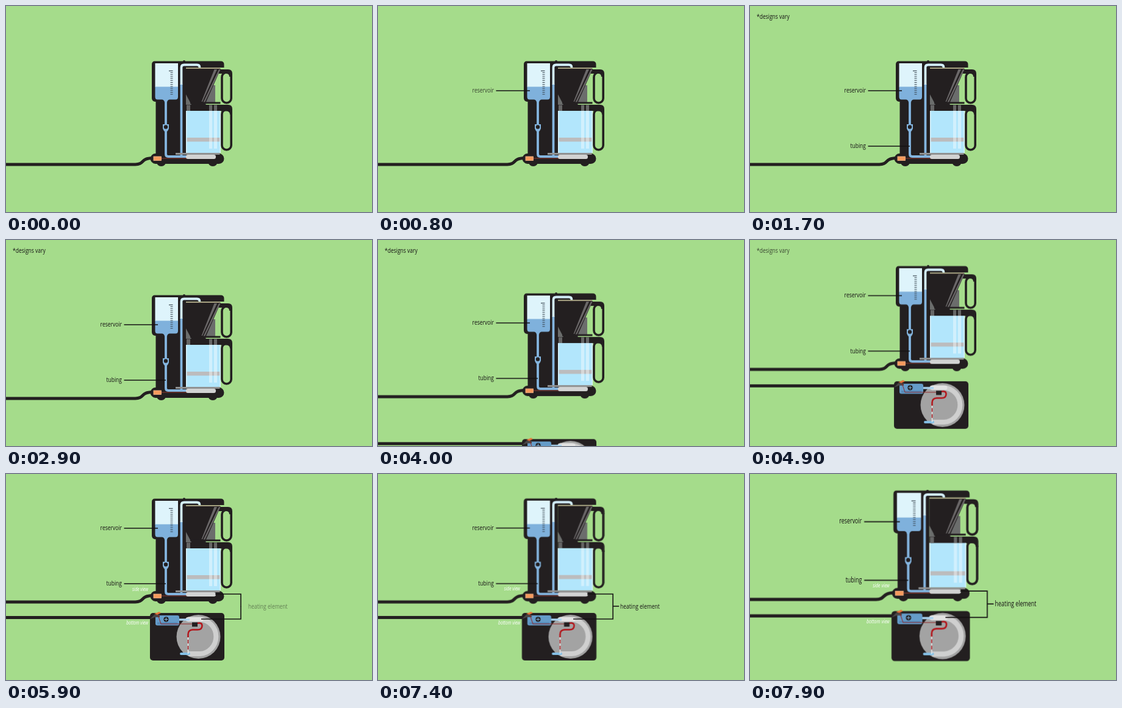
An HTML page without scripts for the animation above (8000 ms loop, 600x338 px).

```html
<!DOCTYPE html>
<html lang="en">
<head>
<meta charset="utf-8">
<title>Coffee maker diagram</title>
<style>
html, body { margin: 0; width: 100%; height: 100%; overflow: hidden; background: #a5dc8b; }
svg { display: block; width: 100vw; height: 100vh; }
text { font: 500 11.5px "Open Sans", "Noto Sans", sans-serif; fill: #151213; }
.end { text-anchor: end; }
.view { font-size: 9px; font-style: italic; fill: #fff; }
.dark { fill: #231f20; }
.line, .tube, .cable, .loop { fill: none; }
.line { stroke: #151213; stroke-width: 1.6; stroke-dasharray: 1 2; }
.tube { stroke: #84b5df; stroke-width: 3.8; stroke-linejoin: round; }
.air { stroke: #d3eefa; }
.cable { stroke: #231f20; stroke-width: 5; }
.loop { stroke: #231f20; stroke-width: 3.6; }

.zoom, .side, .bottom, .a { animation: 8s linear infinite; }
.zoom { animation-name: zoom; transform-origin: 312px 288px; }
.side { animation-name: side; }
.bottom { animation-name: bottom; }
.res-line { animation-name: resLine; }
.res-text { animation-name: resText; }
.tub-line { animation-name: tubLine; }
.tub-text { animation-name: tubText; }
.note { animation-name: note; }
.views { animation-name: views; }
.heat-line { animation-name: heatLine; }
.heat-tick { animation-name: heatTick; }
.heat-text { animation-name: heatText; }

@keyframes zoom {
  0%, 90% { transform: scale(1); animation-timing-function: cubic-bezier(.33, 0, .67, 0); }
  100% { transform: scale(1.08); }
}
@keyframes side {
  0%, 45% { transform: translateY(0); animation-timing-function: cubic-bezier(.69, 0, .34, 1); }
  65.6%, 100% { transform: translateY(-50px); }
}
@keyframes bottom {
  0%, 45% { transform: translateY(117px); animation-timing-function: cubic-bezier(.42, 0, .48, 1); }
  64.2%, 100% { transform: translateY(0); }
}
@keyframes resLine { 0%, 5% { stroke-dashoffset: 1.02; } 9%, 100% { stroke-dashoffset: 0; } }
@keyframes tubLine { 0%, 12% { stroke-dashoffset: 1.02; } 16%, 100% { stroke-dashoffset: 0; } }
@keyframes heatLine { 0%, 67.5% { stroke-dashoffset: 1.02; } 72.5%, 100% { stroke-dashoffset: 0; } }
@keyframes heatTick { 0%, 74% { stroke-dashoffset: 1.02; } 76%, 100% { stroke-dashoffset: 0; } }
@keyframes resText { 0%, 7% { opacity: 0; } 11%, 100% { opacity: 1; } }
@keyframes tubText { 0%, 13.5% { opacity: 0; } 17.5%, 100% { opacity: 1; } }
@keyframes heatText { 0%, 71.5% { opacity: 0; } 76.5%, 100% { opacity: 1; } }
@keyframes views { 0%, 66% { opacity: 0; } 71%, 100% { opacity: 1; } }
@keyframes note { 0%, 15% { opacity: 0; } 20%, 59% { opacity: 1; } 68%, 100% { opacity: 0; } }
</style>
</head>
<body>
<svg viewBox="0 0 600 338" preserveAspectRatio="none">
<rect width="600" height="338" fill="#a5dc8b"/>
<g class="zoom">

  <g class="bottom">
    <path class="cable" d="M-20 235.500H239Q245 235.500 249 231"/>
    <rect class="dark" x="236" y="228" width="122" height="78" rx="5"/>
    <circle cx="315.500" cy="267" r="36" fill="#a3a3a3"/>
    <path d="M298 238.500H318A28 28.300 0 0 1 318 295H299" fill="none" stroke="#cfcfcf" stroke-width="8"/>
    <path d="M298 238.500H320" stroke="#e2e2e2" stroke-width="7" stroke-linecap="round"/>
    <path d="M283 239H301" stroke="#a9d3ef" stroke-width="3.400"/>
    <path d="M287 295H300" stroke="#84c0e6" stroke-width="4" stroke-linecap="round"/>
    <!-- tank -->
    <rect x="245" y="232" width="39" height="16.500" rx="3" fill="#659cc9"/>
    <path d="M248 245H281" stroke="#5587b5" stroke-width="3"/>
    <circle class="dark" cx="262.500" cy="238.500" r="4.200"/>
    <path d="M259.500 238.500h6M262.500 235.500v6" stroke="#84b5df"/>
    <path d="M236 238L243 231H252V235H244Z" fill="#4a4748"/>
    <path d="M243 229.500L251 226L254 228L248 231Z" fill="#e8743b"/>
    <!-- wiring -->
    <path d="M249 231L254 246H306" fill="none" stroke="#8f2626"/>
    <path d="M313 245Q321.500 243 321.500 249Q321.500 255.500 314 255.500H306Q298.500 256 298.500 263V268" fill="none" stroke="#b3151b" stroke-width="2.500"/>
    <path d="M298.500 268V295" stroke="#eee" stroke-width="1.400"/>
    <path d="M298.500 272V292" stroke="#b3151b" stroke-width="1.400" stroke-dasharray="6 4"/>
    <rect class="dark" x="305" y="243.500" width="9" height="7"/>
  </g>

  <g class="side">
    <path class="cable" d="M-20 260H212C227 260 220 250 240 249.500"/>
    <!-- housing -->
    <path class="dark" d="M244 90.500H352Q357.500 90.500 357.500 96V101H295V242H349A8.500 8.500 0 0 1 349 259H245A8.500 8.500 0 0 1 245.500 242V157H244Q239 156 239 151V96Q239 90.500 244 90.500Z"/>
    <circle class="dark" cx="292" cy="91" r="2"/>
    <circle class="dark" cx="254.500" cy="255" r="8"/>
    <circle class="dark" cx="339" cy="255" r="8"/>

    <!-- reservoir -->
    <path d="M244.500 94H282V133H244.500Z" fill="#def4fb"/>
    <path d="M244.500 132.500H282V149Q282 153.500 278 153.500H268Q264.500 154 264 158H260Q259.500 154 256 153.500H248.500Q244.500 153.500 244.500 149Z" fill="#7fb1dc"/>
    <path d="M271.500 109V146.500" stroke="#3a4650" stroke-width="4" stroke-dasharray="1 2.200"/>
    <path d="M267 106.500H273.500" stroke="#3a4650" stroke-width="1.200"/>

    <!-- tubing -->
    <path class="tube" d="M262 155V243Q262 247 266 247H297M287.500 247V128"/>
    <path class="tube air" d="M287.500 129V101Q287.500 96.500 292 96.500H313Q317.500 96.500 317.500 101"/>
    <path d="M257 194H267V201Q266 204 264 206H260Q258 204 257 201Z" fill="#84b5df"/>
    <circle class="dark" cx="262" cy="198.500" r="3.200"/>

    <!-- power and heater -->
    <path d="M254 250H300" stroke="#8f3a30"/>
    <rect x="242" y="247" width="12.500" height="6.500" fill="#f59a5c" stroke="#f8b68c" stroke-width=".8"/>
    <rect x="295" y="244" width="49" height="7" rx="3.200" fill="#d2d3d3"/>
    <rect x="278" y="241" width="72.500" height="3" fill="#919292"/>

    <!-- filter basket -->
    <rect class="loop" x="354" y="109" width="15.200" height="50" rx="7.500"/>
    <path class="dark" d="M349 104H364Q371 104 371 111V116H366Q366 111 361 111H349Z"/>
    <path d="M295 130H343V160H328V162.500H295Z" fill="#6b6d6c"/>
    <path class="dark" d="M295 103H352L326 162H304L295 145Z"/>
    <path d="M349 104H351.500L326 158H323.500ZM341.500 104H346L322 157H320.500Z" fill="#6b6869"/>
    <path d="M295 102.200H351" stroke="#a79a80" stroke-width="1.800"/>
    <path d="M302 159H351.500" stroke="#231f20" stroke-width="3"/>

    <!-- carafe -->
    <rect class="loop" x="354" y="170" width="15.200" height="66" rx="7.500"/>
    <path class="dark" d="M295 162H364Q371 162 371 169V178H367Q367 172.500 361 172.500H295Z"/>
    <path class="dark" d="M304 163L307 160H325L329 163Z"/>
    <rect x="295" y="172" width="57" height="69" fill="#b2e6fc"/>
    <rect x="295" y="216" width="57" height="6.500" fill="#bcbcbd"/>
    <path d="M296 162.500H302V172H296ZM333 162.500H338V172H333ZM341 162.500H346V172H341Z" fill="#666"/>
    <path d="M333 172H338V234H333ZM341 172H346V234H341Z" fill="#fff" opacity=".4"/>
    <path d="M295.800 172V241M351.200 172V241" stroke="#d7f1fb" stroke-width="1.600"/>

    <path class="line a res-line" pathLength="1" d="M249 139H193.500"/>
    <path class="line a tub-line" pathLength="1" d="M262 230H193.500"/>
    <text class="end a res-text" transform="translate(190 142) scale(.74 1)">reservoir</text>
    <text class="end a tub-text" transform="translate(190 233.300) scale(.74 1)">tubing</text>
  </g>

  <text class="a note" transform="translate(11 21) scale(.74 1)">*designs vary</text>
  <g class="a views">
    <text class="view end" transform="translate(233 191.500) scale(.74 1)">side view</text>
    <text class="view end" transform="translate(233 247) scale(.74 1)">bottom view</text>
  </g>
  <path class="line a heat-line" pathLength="1" d="M343 197H385V217.500"/>
  <path class="line a heat-line" pathLength="1" d="M320 238H385V217"/>
  <path class="line a heat-tick" pathLength="1" d="M385 217H395"/>
  <text class="a heat-text" transform="translate(397 221) scale(.74 1)">heating element</text>
</g>
</svg>
</body>
</html>
```
